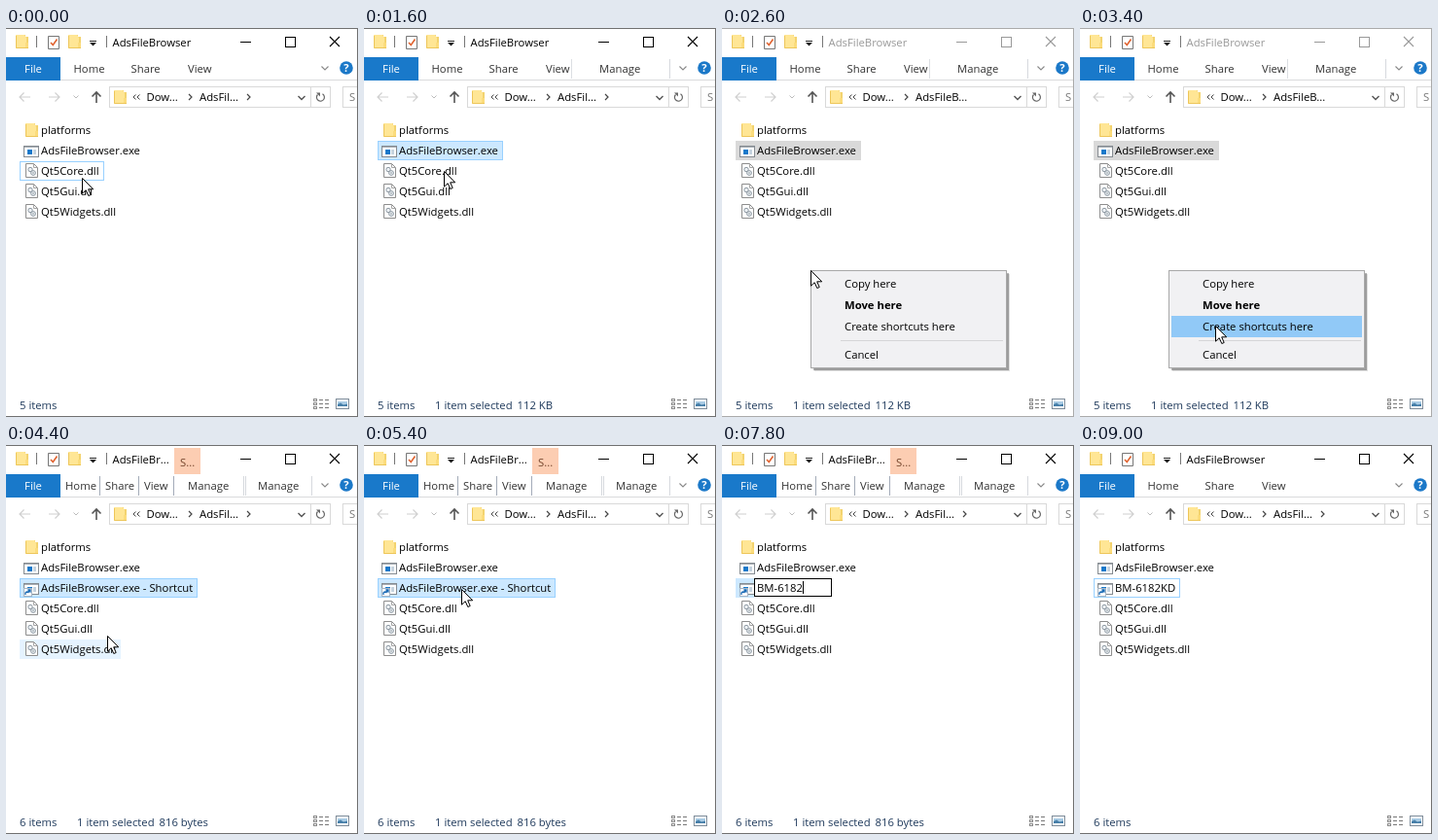
An HTML page that plays this animation: 362x400 px, repeating every 9.6 s.

```html
<!DOCTYPE html>
<html lang="en">
<head>
<meta charset="utf-8">
<title>File browser</title>
<style>
html, body { margin: 0; width: 100%; height: 100%; overflow: hidden; background: #fff; }
svg { display: block; width: 362px; height: 400px; }
text { font: 11.3px "Open Sans", "Noto Sans", sans-serif; white-space: pre; }
rect { shape-rendering: crispEdges; }
</style>
</head>
<body>
<svg id="stage" viewBox="0 0 362 400"></svg>
<script>
const LOOP = 9600, STEP = 200;
const stage = document.getElementById('stage');
const pen = document.createElement('canvas').getContext('2d');
const NEW_NAME = 'BM-6182KD';
const EXE = 'AdsFileBrowser.exe';

// Pointer stops: time, x, y
const track = [
  [0, 78, 154], [200, 78, 154], [600, 83, 124], [1200, 82, 124], [1600, 82, 147],
  [2200, 91, 249], [2600, 91, 249], [3400, 139, 306], [3800, 139, 306],
  [4400, 104, 196], [4800, 100, 148], [5600, 100, 148], [6000, 104, 172], [9600, 104, 172]
];

function pointer(t) {
  const i = Math.max(1, track.findIndex(p => p[0] >= t));
  const [a, b] = [track[i - 1], track[i]];
  const k = Math.max(0, (t - a[0]) / (b[0] - a[0]));
  return [a[1] + (b[1] - a[1]) * k, a[2] + (b[2] - a[2]) * k];
}

const width = s => {
  pen.font = '11.3px "Open Sans", "Noto Sans", sans-serif';
  return pen.measureText(s).width;
};
const text = (x, y, s, fill = '#000', more = '') =>
  `<text x="${x}" y="${y}" fill="${fill}" ${more}>${s}</text>`;
const box = (x, y, w, h, fill, more = '') =>
  `<rect x="${x}" y="${y}" width="${w}" height="${h}" fill="${fill}" ${more}/>`;
// One-pixel frame on whole pixels
const frame = (x, y, w, h, fill, stroke) => box(x + .5, y + .5, w - 1, h - 1, fill, `stroke="${stroke}"`);
const line = (d, stroke, w = 1, more = '') =>
  `<path d="${d}" fill="none" stroke="${stroke}" stroke-width="${w}" ${more}/>`;
const shape = (d, fill, more = '') => `<path d="${d}" fill="${fill}" ${more}/>`;
const at = (x, y, s) => `<g transform="translate(${x} ${y})">${s}</g>`;

const folder = (x, y) => at(x, y,
  shape('M1 0H10V2H13V14H1Z', '#f3d36f') +
  shape('M0 0H9L11 3V14H0Z', '#ffe695') +
  shape('M10 8H13V14H10Z', '#fbdc7c') +
  line('M.5 1V13.5H13', '#edc65a'));

const exeIcon = y => at(18, y,
  frame(0, 0, 16, 12, '#fff', '#858b91') + box(1, 1, 14, 1, '#a9afb5') +
  box(4, 4, 5, 5, '#1979ca') + box(10, 4, 3, 5, '#c5d3df'));

const linkIcon = y => exeIcon(y) + at(18, y + 5,
  frame(0, 0, 9, 9, '#fff', '#a5b5c5') +
  line('M2 7V5.5Q2 4 4 4H6M4.3 2H7V4.8M7 2L4 5', '#1668b3', 1.3));

const dllIcon = y => at(20, y,
  shape('M.5 .5H8.5L12.5 4.5V14.5H.5Z', '#fff', 'stroke="#8d8d8d"') +
  line('M8.5 .5V4.5H12.5', '#a5a5a5') +
  `<g fill="#eef2f5" stroke="#8c98a2"><circle cx="5" cy="6.5" r="2.2"/><circle cx="8" cy="10" r="2.4"/></g>` +
  `<circle cx="8" cy="10" r=".7" fill="#6f7c88"/>`);

function titleBar(active, narrow) {
  const ink = active ? '#000' : '#999';
  let s = folder(10, 7) + box(31, 8, 1, 12, '#777') +
    at(43, 8, shape('M.5 .5H11.5V13.5H.5Z', '#fff', 'stroke="#777"') +
      line('M3 7L5.3 9.5L9.5 3.5', '#e0622f', 1.6)) +
    folder(64, 7) + box(86, 13, 7, 1, '#222') + shape('M86 15H93L89.5 18.5Z', '#222') +
    box(103, 8, 1, 12, '#777') +
    text(109.5, 19, narrow ? 'AdsFileBr...' : 'AdsFileBrowser', ink);
  if (narrow) s += box(173, 3, 27, 27, '#fccdb2') + text(179, 22, 'S...', '#74452c');
  return s + box(241, 14, 11, 1, ink) + frame(287, 9, 11, 11, 'none', ink) +
    line('M333 9L343 19M343 9L333 19', ink, 1.1);
}

function ribbon(manage, narrow) {
  const tabs = narrow
    ? [[61, 'Home'], [102, 'Share'], [142, 'View'], [187, 'Manage'], [259, 'Manage']]
    : [[69.5, 'Home'], [128.5, 'Share'], [187, 'View'], ...(manage ? [[242, 'Manage']] : [])];
  const rule = (x, c) => box(x, 32, 1, 20, c);
  let s = box(0, 30, 56, 24, '#1979ca') + text(28, 46, 'File', '#fff', 'text-anchor="middle"') +
    box(56, 53, 305, 1, '#dadbdc');
  s += tabs.map(([x, name]) => text(x, 46, name, '#333')).join('');
  if (narrow) s += [96, 136, 172].map(x => rule(x, '#a3abb8')).join('') + rule(244, '#d6d9de') + rule(246, '#d6d9de');
  else if (manage) s += rule(213, '#dcdfe3');
  if (manage) s += rule(314, '#d6d9de');
  return s + line('M324.5 39.5L328 43L331.5 39.5', '#888', 1.1) +
    '<circle cx="350" cy="41" r="6.8" fill="#1b78c8"/>' +
    text(350, 45, '?', '#fff', 'text-anchor="middle" style="font-weight:bold"');
}

function addressBar(active) {
  const arrow = (x, dir, c) =>
    at(x, 71, line(`M${-5.5 * dir} 0H${5.5 * dir}M${dir} -4.5L${5.5 * dir} 0L${dir} 4.5`, c, 1.2));
  const next = x => line(`M${x - 2} 68L${x + 1} 71L${x - 2} 74`, '#444', 1.2);
  return arrow(19.5, -1, '#d0d0d0') + arrow(49.5, 1, '#d0d0d0') +
    line('M69.5 69.5L72 72L74.5 69.5', '#bbb') +
    line('M93 77V66M88.5 70.5L93 66L97.5 70.5', '#555', 1.6) +
    frame(106, 60, 228, 22, '#fff', '#d9d9d9') + folder(111, 64) +
    line('M133.5 68.5L131 71L133.5 73.5M137.5 68.5L135 71L137.5 73.5', '#444') +
    text(144.5, 75, 'Dow...') + next(190) +
    text(199, 75, active ? 'AdsFil...' : 'AdsFileB...') + (active ? next(250) : '') +
    line('M300.5 70L304 73.5L307.5 70', '#555', 1.4) + box(313, 61, 1, 20, '#d9d9d9') +
    line('M325.5 67.8A4 4 0 1 1 320.5 68.5', '#666', 1.2) + shape('M319 66.5H323V70.5Z', '#666') +
    frame(346, 60, 20, 22, '#fff', '#d9d9d9') + text(353, 75, 'S', '#777');
}

function status(count, info) {
  const ink = '#1e395b';
  let s = text(14, 392, count + ' items', ink);
  if (info) s += text(73, 392, '1 item selected', ink) + text(157.5, 392, info, ink);
  for (const y of [381, 385, 389])
    s += frame(316, y, 4, 3, '#fff', '#8a8a8a') + box(322, y + 1, 4, 1, '#777') + box(328, y + 1, 4, 1, '#777');
  return s + frame(339, 381, 14, 11, '#fff', '#7d8b99') + box(341, 384, 10, 5, '#a9cbe4') +
    shape('M341 389V387L344 385.5L347 387.5L351 386.5V389Z', '#477fa9');
}

function editor(t, name) {
  const count = Math.min(9, Math.max(0, Math.floor((t - 6600) / 170)));
  const typed = count ? NEW_NAME.slice(0, count) : name;
  const w = Math.round(width(typed));
  let s = frame(33, 137, w + 33, 19, '#fff', '#000');
  s += count ? box(36 + w, 140, 1, 13, '#000') : box(36, 139, w, 15, '#0078d7');
  return s + text(36, 151, typed, count ? '#000' : '#fff');
}

function files(t, active) {
  const linked = t >= 3800, editing = t >= 5600 && t < 8400;
  const name = t >= 8400 ? NEW_NAME : EXE + ' - Shortcut';
  const rows = [['platforms'], [EXE, exeIcon]];
  if (linked) rows.push([name, linkIcon]);
  for (const part of ['Core', 'Gui', 'Widgets']) rows.push([`Qt5${part}.dll`, dllIcon]);

  const idle = t < 800 || t >= 8600;
  const chosen = idle ? -1 : linked ? 2 : 1;
  const focus = idle ? 2 : -1;
  const [hx, hy] = pointer(t - 100);
  const canHover = (t >= 200 && t < 1400) || (t >= 4000 && t < 5600);

  return rows.map(([label, icon], i) => {
    const top = 95 + 21 * i, right = Math.round(36 + width(label) + 5);
    const over = canHover && hy >= top && hy < top + 21 && hx < right;
    let s = '';
    if (i === chosen) {
      if (editing) s += box(14, top, 19, 20, '#cce8ff');
      else if (active) s += frame(14, top, right - 14, 20, '#cce8ff', '#99d1ff');
      else s += box(14, top, right - 14, 20, '#d9d9d9');
    } else {
      if (over) s += box(14, top, right - 14, 20, '#e5f3ff');
      if (i === focus) s += frame(14, top, right - 14, 20, 'none', '#99d1ff');
    }
    s += icon ? icon(top + (icon === dllIcon ? 2 : 5)) : folder(20, top + 3);
    return s + (editing && i === chosen ? editor(t, label) : text(36, top + 14, label));
  }).join('');
}

function menu(t) {
  const y = pointer(t)[1];
  const items = [['Copy here', 252, 267], ['Move here', 274, 289],
    ['Create shortcuts here', 296, 311], ['Cancel', 325, 340]];
  let s = box(95, 253, 201, 100, '#000', 'opacity=".12"') + box(94, 252, 201, 100, '#000', 'opacity=".3"') +
    frame(91, 249, 202, 101, '#f1f1f3', '#a8a8a8') + box(122, 321, 167, 1, '#d5d5d7');
  for (const [name, top, base] of items) {
    if (y >= top && y < top + 22) s += box(94, top, 196, 22, '#91c9f7');
    s += text(126, base, name, '#000', name === 'Move here' ? 'style="font-weight:bold"' : '');
  }
  return s;
}

const cursor = (x, y) => at(Math.round(x), Math.round(y),
  shape('M.5 .5V16.2L4.2 12.7L6.8 18.5L9.2 17.5L6.7 11.8H11.7Z', '#fff', 'stroke="#000"'));

function draw(t) {
  const active = t < 2400 || t >= 3800;
  const narrow = t >= 3800 && t < 8600;
  const manage = t >= 800 && t < 8600;
  const info = !manage ? '' : narrow ? '816 bytes' : '112 KB';
  const edge = active ? '#707070' : '#aaa';
  let s = box(0, 0, 362, 400, '#fff') + titleBar(active, narrow) + ribbon(manage, narrow) +
    addressBar(active) + files(t, active) + status(t >= 3800 ? 6 : 5, info) +
    box(0, 0, 362, 1, edge) + box(361, 0, 1, 400, edge) + box(0, 399, 362, 1, edge);
  if (t >= 2400 && t < 3800) s += menu(t);
  if (t < 6800) s += cursor(...pointer(t));
  stage.innerHTML = s;
}

let start = null, shown = -1;
function tick(now) {
  if (start === null) start = now;
  const t = Math.floor((now - start) % LOOP / STEP) * STEP;
  if (t !== shown) draw(shown = t);
  requestAnimationFrame(tick);
}
draw(0);
requestAnimationFrame(tick);
</script>
</body>
</html>
```
